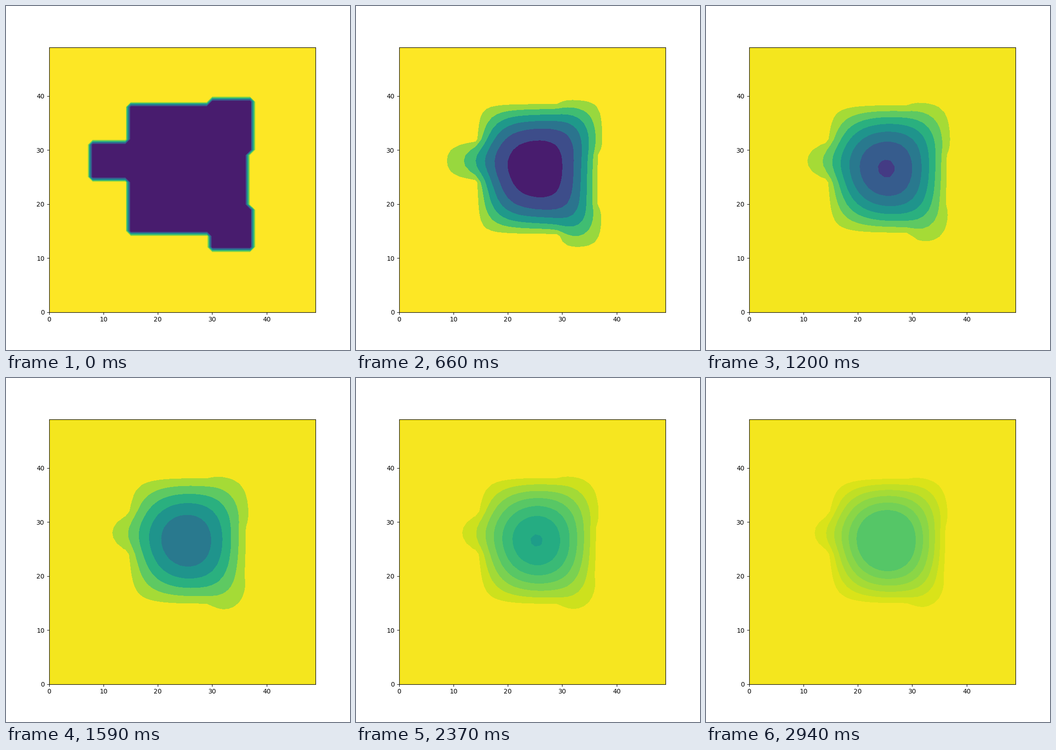
Animation, 748 px wide and 748 px high, one loop 2970 ms. Source, as a matplotlib script:

```python
import numpy as np
import matplotlib.pyplot as plt
from matplotlib.animation import FuncAnimation
from matplotlib.colors import Normalize

SIZE, DPI = 748, 100
FRAMES, INTERVAL = 99, 30
N = 50
COLD, WARM = 18.0, 31.0
SUBSTEPS = 5
CORE_FRAME, CORE_TEMP = 79, 25.54   # coldest spot at a known time

# Rooms as inclusive (x0, x1, y0, y1) node ranges
ROOMS = [(15, 36, 15, 38), (8, 14, 25, 31), (30, 37, 30, 39), (30, 37, 12, 19)]

inside = np.zeros((N, N), bool)
for x0, x1, y0, y1 in ROOMS:
    inside[y0:y1 + 1, x0:x1 + 1] = True


def simulate(rate, count):
    """Heat flow into the rooms; everything outside stays warm."""
    t = np.where(inside, COLD, WARM)
    gain = np.where(inside, rate / SUBSTEPS, 0.0)[1:-1, 1:-1]
    states = [t.copy()]
    for _ in range(count - 1):
        for _ in range(SUBSTEPS):
            lap = (t[2:, 1:-1] + t[:-2, 1:-1] + t[1:-1, 2:] + t[1:-1, :-2]
                   - 4 * t[1:-1, 1:-1])
            t[1:-1, 1:-1] += gain * lap
        states.append(t.copy())
    return states


def find_rate(lo=0.3, hi=0.8):
    """Diffusion per frame that brings the core to its known temperature."""
    for _ in range(18):
        mid = (lo + hi) / 2
        if simulate(mid, CORE_FRAME + 1)[-1].min() < CORE_TEMP:
            lo = mid
        else:
            hi = mid
    return (lo + hi) / 2


states = simulate(find_rate(), FRAMES)

fig, ax = plt.subplots(figsize=(SIZE / DPI, SIZE / DPI), dpi=DPI)
cmap = plt.get_cmap("viridis")
norm = Normalize(COLD, WARM)
bands = None


def band_colors(levels, temps):
    """Colour per band; bands of nearly equal colour share their mean."""
    colors = cmap(norm((levels[1:] + levels[:-1]) / 2))
    area = np.histogram(temps, levels)[0] + 1e-6
    keys = (colors[:, :3] * 255).round().astype(int) // [32, 16, 32]
    for key in np.unique(keys, axis=0):
        same = (keys == key).all(axis=1)
        colors[same] = np.average(colors[same], axis=0, weights=area[same])
    return colors


def draw(i):
    global bands
    if bands is not None:
        bands.remove()
    bands = ax.contourf(states[i], cmap=cmap, vmin=COLD, vmax=WARM)
    colors = band_colors(np.asarray(bands.levels), states[i])
    bands.set_array(None)
    bands.set_facecolor(colors)
    ax.set(xlim=(0, N - 1), ylim=(0, N - 1))
    return [bands]


anim = FuncAnimation(fig, draw, frames=FRAMES, interval=INTERVAL,
                     repeat=True, repeat_delay=0)
plt.show()
```
